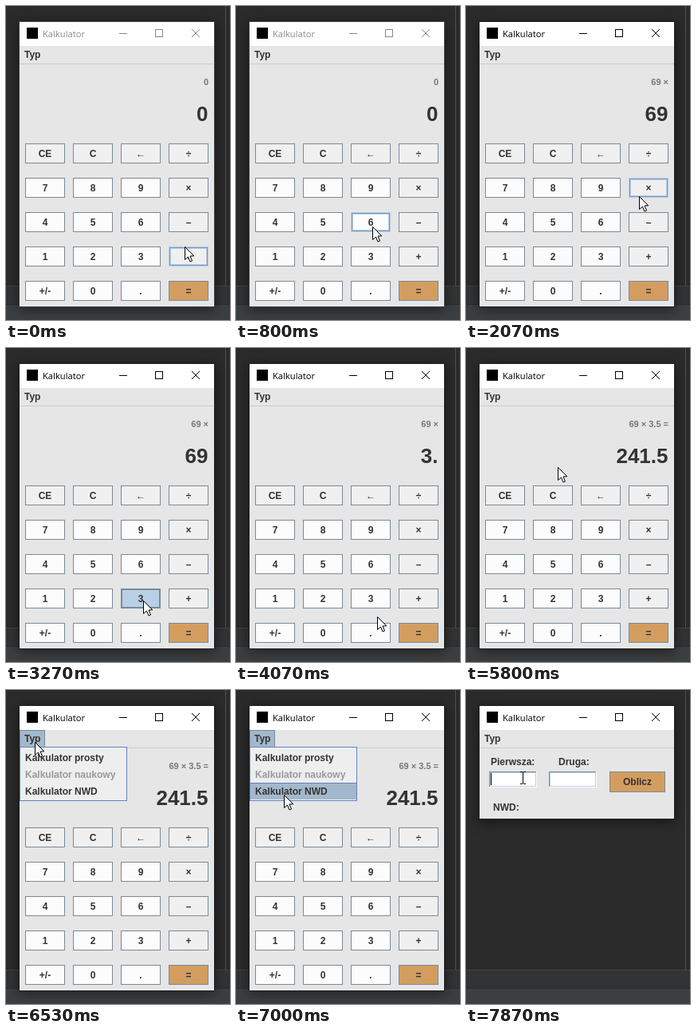
An HTML page with a canvas that plays this animation: 281x393 px, repeating every 8000 ms.

```html
<!DOCTYPE html>
<html lang="pl">
<head>
<meta charset="utf-8">
<title>Kalkulator</title>
<style>
  html, body { margin: 0; width: 281px; height: 393px; overflow: hidden; background: #2b2b2b; }
  canvas { display: block; }
</style>
</head>
<body>
<canvas id="stage" width="281" height="393"></canvas>
<script>
const ctx = document.getElementById('stage').getContext('2d');
const LOOP = 8000, FPS = 15;
const SANS = '"Liberation Sans", Arial, sans-serif';
const INK = '#333', EDGE = '#7a8a99', PALE = '#b8cfe5', SELECT = '#a3b8cc', ORANGE = '#d39d60';

// Pointer stops: tick, x, y
const stops = [
  [0, 224, 301], [4, 265, 304], [12, 171, 276], [20, 171, 276], [24, 172, 235], [26, 172, 235],
  [29, 217, 238], [32, 217, 238], [37, 178, 350], [41, 172, 316], [51, 172, 316], [55, 171, 359],
  [58, 171, 359], [61, 177, 336], [67, 112, 275], [69, 112, 275], [74, 226, 360], [82, 226, 360],
  [87, 115, 149], [89, 115, 149], [95, 36, 65], [99, 36, 65], [105, 60, 131], [108, 60, 131],
  [118, 71, 109], [120, 71, 109]
];

// Clicks: tick, key, history line and value after release
const clicks = [
  [18, '6', '0', '6'], [25, '9', '0', '69'], [30, '×', '69 ×', '69'], [49, '3', '69 ×', '3'],
  [56, '.', '69 ×', '3.'], [68, '5', '69 ×', '3.5'], [77, '=', '69 × 3.5 =', '241.5']
];
const ACTIVE = 18, MENU_OPEN = 96, MENU_CLOSE = 108, SWITCH = 109;

const keys = ['CE', 'C', '←', '÷', '7', '8', '9', '×', '4', '5', '6', '–',
  '1', '2', '3', '+', '+/-', '0', '.', '='].map((label, i) => ({
  label, x: 24 + i % 4 * 60, y: 172 + (i >> 2) * 43, w: 50, h: 25,
  fill: label === '=' ? ORANGE : i < 4 || i % 4 === 3 ? '#f0f0f0' : '#fcfcfc'
}));
const solve = { label: 'Oblicz', x: 180, y: 102, w: 70, h: 26, fill: ORANGE };

function box(x, y, w, h, color) {
  ctx.fillStyle = color;
  ctx.fillRect(x, y, w, h);
}

function frame(x, y, w, h, color) {
  ctx.strokeStyle = color;
  ctx.lineWidth = 1;
  ctx.strokeRect(x + .5, y + .5, w - 1, h - 1);
}

function text(str, x, y, { font = 'bold 12px ' + SANS, color = INK, align = 'left' } = {}) {
  ctx.font = font;
  ctx.fillStyle = color;
  ctx.textAlign = align;
  ctx.fillText(str, x, y);
}

const inside = (p, r) => p.x >= r.x && p.x < r.x + r.w && p.y >= r.y && p.y < r.y + r.h;

function pointerAt(tick) {
  const i = stops.findIndex(s => s[0] > tick);
  const [t0, x0, y0] = stops[i - 1], [t1, x1, y1] = stops[i];
  const u = (tick - t0) / (t1 - t0), e = u * u * (3 - 2 * u);
  return { x: Math.round(x0 + (x1 - x0) * e), y: Math.round(y0 + (y1 - y0) * e) };
}

function drawDesktop() {
  box(0, 0, 281, 393, '#2b2b2b');
  box(275, 0, 1, 350, '#505050');
  box(0, 350, 281, 1, '#414345');
  box(0, 351, 281, 22, '#313335');
  box(0, 373, 281, 1, '#292b2c');
  box(0, 374, 281, 19, '#3c3f41');
}

function drawWindow(height, active) {
  ctx.save();
  ctx.shadowColor = 'rgba(0,0,0,.5)';
  ctx.shadowBlur = 14;
  ctx.shadowOffsetY = 3;
  box(16, 19, 246, height + 2, active ? '#1e1e1e' : '#404040');
  ctx.restore();
  box(17, 20, 244, height, '#e6e6e6');
  box(17, 20, 244, 30, '#fff');
  box(26, 27, 14, 14, '#000');
  text('Kalkulator', 46, 39, {
    font: '11.2px "Open Sans", "Noto Sans", sans-serif', color: active ? '#000' : '#8c8c8c'
  });
  const glyph = active ? '#000' : '#888';
  box(142, 34, 10, 1, glyph);
  frame(187, 29, 10, 10, glyph);
  ctx.beginPath();
  ctx.moveTo(233, 29); ctx.lineTo(243, 39);
  ctx.moveTo(243, 29); ctx.lineTo(233, 39);
  ctx.stroke();
  box(17, 72, 244, 1, '#cbcbcb');
}

function drawButton({ label, x, y, w, h, fill }, hover, pressed) {
  box(x, y, w, h, pressed ? PALE : fill);
  frame(x, y, w, h, hover && !pressed ? PALE : EDGE);
  if (hover) {
    frame(x + 1, y + 1, w - 2, h - 2, pressed ? EDGE : '#7a98bc');
    if (!pressed) frame(x + 2, y + 2, w - 4, h - 4, PALE);
  }
  text(label, x + w / 2, y + 17, { align: 'center' });
}

function drawCalculator(tick, pointer, menuOpen) {
  const done = clicks.filter(c => tick > c[0]).pop() || [0, '', '0', '0'];
  text(done[2], 254, 99, { font: 'bold 11px ' + SANS, color: '#777', align: 'right' });
  text(done[3], 253.5, 144, { font: 'bold 26px ' + SANS, align: 'right' });
  for (const key of keys) {
    const pressed = clicks.some(c => c[0] === tick && c[1] === key.label);
    drawButton(key, !menuOpen && inside(pointer, key), pressed);
  }
}

function drawMenu(pointer) {
  box(17, 50, 32, 22, SELECT);
  frame(17, 50, 32, 22, EDGE);
  box(17, 71, 135, 68, '#eee');
  ['Kalkulator prosty', 'Kalkulator naukowy', 'Kalkulator NWD'].forEach((label, i) => {
    const row = { x: 18, y: 74 + i * 21, w: 133, h: 21 }, disabled = i === 1;
    if (!disabled && inside(pointer, row)) {
      box(row.x, row.y, row.w, row.h, SELECT);
      box(row.x, row.y, row.w, 1, '#6382bf');
    }
    text(label, 24, 89 + i * 21, { color: disabled ? '#999' : INK });
  });
  frame(17, 71, 135, 68, '#6382bf');
}

function drawDivisor(pointer) {
  text('Pierwsza:', 31, 94);
  text('Druga:', 116, 94);
  text('NWD:', 34, 151);
  for (const x of [29, 104]) {
    box(x, 102, 60, 20, '#fff');
    frame(x, 102, 59, 19, EDGE);
    frame(x + 1, 103, 58, 18, PALE);
    box(x + 2, 104, 56, 16, '#fff');
  }
  box(31, 104, 1, 15, '#000');
  drawButton(solve, inside(pointer, solve), false);
}

function drawArrow({ x, y }) {
  ctx.save();
  ctx.translate(x + .5, y + .5);
  ctx.beginPath();
  [[0, 0], [0, 16], [4, 12.5], [6.5, 18.5], [9, 17.5], [6.5, 11.5], [11.3, 11.3]]
    .forEach(p => ctx.lineTo(...p));
  ctx.closePath();
  ctx.fillStyle = '#fff';
  ctx.strokeStyle = '#000';
  ctx.fill();
  ctx.stroke();
  ctx.restore();
}

function drawBeam({ x, y }) {
  box(x, y - 6, 1, 14, '#000');
  for (const top of [y - 7, y + 8]) {
    box(x - 3, top, 3, 1, '#000');
    box(x + 1, top, 3, 1, '#000');
  }
}

function render(now) {
  const tick = Math.floor((now % LOOP + 4) * FPS / 1000) % 120;
  const pointer = pointerAt(tick);
  const divisor = tick >= SWITCH, menuOpen = tick >= MENU_OPEN && tick < MENU_CLOSE;
  drawDesktop();
  drawWindow(divisor ? 141 : 356, tick >= ACTIVE);
  if (divisor) drawDivisor(pointer);
  else drawCalculator(tick, pointer, menuOpen);
  if (menuOpen) drawMenu(pointer);
  text('Typ', 23, 65);
  const overField = divisor && inside(pointer, { x: 29, y: 102, w: 60, h: 20 });
  (overField ? drawBeam : drawArrow)(pointer);
}

const start = performance.now();
(function loop() {
  render(performance.now() - start);
  requestAnimationFrame(loop);
})();
</script>
</body>
</html>
```
